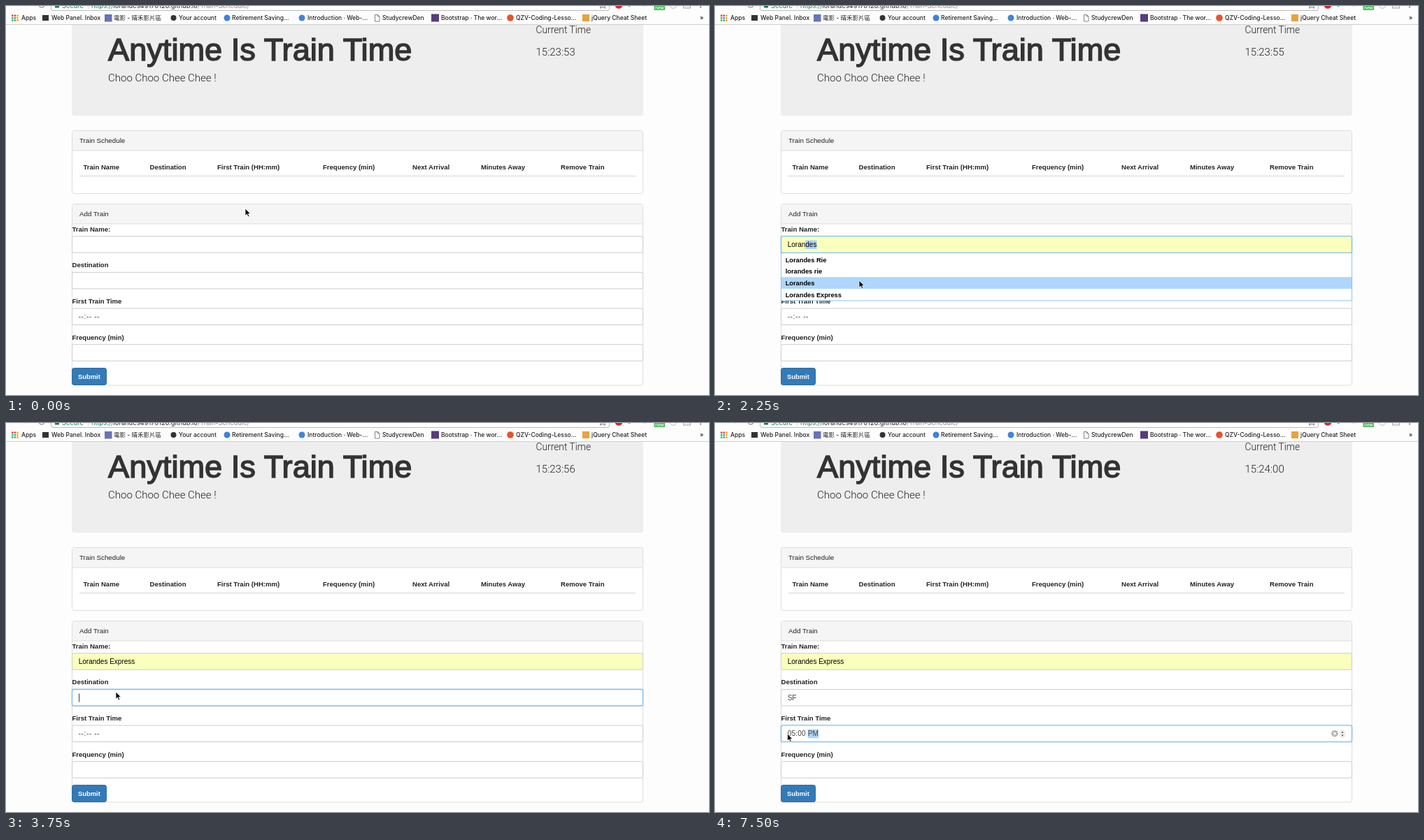
Animation, 1005 px wide and 557 px high, one loop 8000 ms. Source, as an HTML page:

```html
<!DOCTYPE html>
<html lang="en">
<head>
<meta charset="utf-8">
<title>Anytime Is Train Time</title>
<style>
  html, body { margin: 0; width: 100%; height: 100%; overflow: hidden; background: #fdfdfd; }
  svg { display: block; width: 100%; height: 100%; }
  text { white-space: pre; font: 10px "Liberation Sans", Arial, sans-serif; fill: #222; }
  .bar { font: 500 8.5px Inter, "Noto Sans CJK TC", "Noto Sans CJK SC", "Noto Sans CJK", sans-serif; }
  .url { font: 9.3px Inter, sans-serif; }
  .title { font-size: 45.2px; fill: #333; stroke: #333; stroke-width: 1.5px; }
  .light { font: 300 15px Roboto, "Liberation Sans", sans-serif; }
  .label { font-weight: bold; font-size: 9.56px; }
  .head { font-size: 9.75px; }
  .row { font-weight: bold; font-size: 9.25px; fill: #000; }
  .value { fill: #444; }
  .filled .value { fill: #000; }
  .box { fill: #fff; stroke: #ccc; }
  .filled .box { fill: #faffbd; }
  .glow { fill: none; stroke: #66afe9; stroke-opacity: .14; stroke-width: 3.5; visibility: hidden; }
  .focused .box { stroke: #75b6eb; stroke-width: 1.1; }
  .focused .glow { visibility: visible; }
</style>
</head>
<body>
<svg id="stage" viewBox="0 0 1005 557" preserveAspectRatio="none"></svg>
<script>
const byId = id => document.getElementById(id);
const stage = byId('stage');

const text = (x, y, content, cls = '', extra = '') =>
  `<text x="${x}" y="${y}" class="${cls}" ${extra}>${content}</text>`;
const rect = (x, y, w, h, fill, extra = '') =>
  `<rect x="${x}" y="${y}" width="${w}" height="${h}" fill="${fill}" ${extra}/>`;
const dot = (x, y, r, fill, extra = '') =>
  `<circle cx="${x}" cy="${y}" r="${r}" fill="${fill}" ${extra}/>`;
const path = (d, extra) => `<path d="${d}" ${extra}/>`;

function toolbar() {
  const bookmarks = [
    [22, 'Apps'], [65, 'Web Panel. Inbox'], [154, '電影 - 晴禾影片區'], [247, 'Your account'],
    [323, 'Retirement Saving...'], [431, 'Introduction · Web-...'], [538, 'StudycrewDen'],
    [622, 'Bootstrap · The wor...'], [729, 'QZV-Coding-Lesso...'], [837, 'jQuery Cheat Sheet'], [992, '»']
  ];
  const appColors = ['#e8453c', '#e8453c', '#f5a623', '#3cba54', '#4885ed', '#f5a623', '#3cba54', '#3cba54', '#f5a623'];
  const apps = appColors.map((c, i) => rect(8 + i % 3 * 3.6, 12.5 + Math.floor(i / 3) * 3.4, 2.5, 2.5, c)).join('');
  const url = '<tspan fill="#0b8043">https://</tspan>lorandes49170126.github.io<tspan fill="#888">/Train-Schedule/</tspan>';
  return rect(0, 0, 1005, 26.5, '#fdfdfd') +
    rect(0, 26, 1005, 1, '#cfcfcf') +
    rect(64.5, -14, 798, 20.5, '#fff', 'stroke="#bbb" rx="2.5"') +
    rect(70, -3, 6, 5.5, '#0b8043') +
    text(80, 2.5, '<tspan fill="#0b8043">Secure</tspan>', 'url') +
    rect(117, 0, .8, 4, '#ccc') +
    text(122, 2.5, url, 'url') +
    dot(51, -1.8, 4, 'none', 'stroke="#777"') +
    path('M24 -3l4 4M31 -3l-3 4', 'stroke="#ddd" fill="none"') +
    path('M849.5 3.2l1-5h5l1 5-3.5-2z', 'fill="none" stroke="#777"') +
    dot(876, -1.5, 5.3, '#d8262c') +
    path('M889 0h4l-2 1.5z', 'fill="#52b788"') +
    dot(913, -3, 4, '#ddd') +
    rect(926.5, -4, 15.5, 10, '#3fb950', 'rx="1"') +
    text(928, 4.6, 'new', 'bar', 'style="fill:#fff;font-size:6.5px"') +
    dot(954, -1.5, 4.8, 'none', 'stroke="#bbb"') +
    rect(968.5, -4, 10, 7, '#eee', 'stroke="#aaa"') +
    dot(993, 1.5, 1, '#666') +
    apps +
    rect(52, 13, 9, 8, '#333') +
    rect(141, 12, 10.5, 10.5, '#6674b8') +
    dot(239.5, 17, 4, '#333') +
    dot(316, 17, 4.5, '#3b82e0') +
    dot(423, 17, 4.5, '#3f86d8') +
    path('M527.5 12.5h4l2.5 2.5v7h-6.5zM531.5 12.5v2.5h2.5', 'fill="#fff" stroke="#777" stroke-width=".9"') +
    rect(608, 11.5, 11, 11, '#563d7c') +
    dot(721, 17, 4.8, '#e8532b') +
    rect(824, 12, 10, 10, '#e8a33d') +
    bookmarks.map(([x, s]) => text(x, 20.3, s, 'bar')).join('');
}

function panel(y, height, title) {
  return rect(94.5, y + .5, 816, height, '#fff', 'stroke="#ddd" rx="3"') +
    path(`M95 ${y + 29}v-25.5q0-2.5 2.5-2.5h810q2.5 0 2.5 2.5v25.5z`, 'fill="#f5f5f5"') +
    rect(95, y + 28.5, 815, 1, '#ddd') +
    text(105, y + 18, title, 'head');
}

function field(id, y, label) {
  const frame = `x="94.5" y="${y}" width="816" height="23.5" rx="2.5"`;
  return text(94.5, y - 7, label, 'label') +
    `<g id="${id}"><rect class="glow" ${frame}/><rect class="box" ${frame}/>` +
    rect(0, y + 5.7, 0, 12.6, '#add3f9', 'class="mark"') +
    text(103.7, y + 15.3, '', 'value') +
    rect(0, y + 6, .9, 12, '#222', 'class="caret"') + '</g>';
}

const columns = [[110.5, 'Train Name'], [205.5, 'Destination'], [302, 'First Train (HH:mm)'], [453, 'Frequency (min)'],
  [581, 'Next Arrival'], [679, 'Minutes Away'], [793, 'Remove Train']];

stage.innerHTML =
  rect(0, 0, 1005, 557, '#fdfdfd') +
  rect(94, 10, 817, 147, '#eee', 'rx="4"') +
  text(146, 78, 'Anytime Is Train Time', 'title') +
  text(146, 108, 'Choo Choo Chee Chee !', 'light') +
  text(757.5, 39, 'Current Time', 'light', 'style="font-size:13.8px"') +
  text(757.5, 70.5, '', 'light', 'id="clock"') +
  toolbar() +
  panel(178, 90, 'Train Schedule') +
  columns.map(([x, s]) => text(x, 234, s, 'label')).join('') +
  rect(105, 242.8, 795, 1.4, '#ddd') +
  panel(283, 259.5, 'Add Train') +
  field('name', 329.7, 'Train Name:') +
  field('dest', 381.4, 'Destination') +
  field('time', 433, 'First Train Time') +
  field('freq', 484.7, 'Frequency (min)') +
  '<g id="spinner">' + rect(893.5, 439.5, 7, 11, '#f1f1f1', 'rx="3.5" stroke="#ddd" stroke-width=".6"') +
  path('M895.3 443.8l1.7-2.3 1.7 2.3zM895.3 446.4l1.7 2.3 1.7-2.3z', 'fill="#555"') + '</g>' +
  '<g id="clear">' + dot(886, 444.7, 4.8, '#b5b5b5') +
  path('M884.2 442.9l3.6 3.6M887.8 442.9l-3.6 3.6', 'stroke="#fff" stroke-width="1.1"') + '</g>' +
  rect(94.5, 518.5, 49, 24, '#337ab7', 'stroke="#2e6da4" rx="2.8"') +
  text(103, 534, 'Submit', 'label', 'style="fill:#fff;font-size:9.4px"') +
  '<g id="menu"></g>' +
  '<g id="pointer">' +
  path('M0 0V10.2L2.4 8 4.1 11.8 5.8 11 4.2 7.4H7.4Z', 'fill="#000" stroke="#fff" stroke-width=".8"') + '</g>';

const suggestions = ['Lorandes Rie', 'lorandes rie', 'Lorandes', 'Lorandes Express', 'LOFA', 'LOFA Codeclub HW'];

// Each entry changes part of the state from its time on; values are [plain, selected, rest].
const changes = [
  [0, { name: [''], dest: [''], time: ['--:-- --'], freq: [''], focus: '', caret: false, rows: 0, hover: -1, filled: false, clear: false }],
  [1000, { focus: 'name', caret: true }],
  [1500, { name: ['L'], rows: 6 }],
  [1750, { name: ['Lo'], rows: 4 }],
  [2000, { name: ['Loran'] }],
  [2250, { name: ['Loran', 'des'], hover: 2, filled: true, caret: false }],
  [2500, { name: ['Loran', 'des Express'], hover: 3 }],
  [2750, { name: ['Lorandes Express'], rows: 0, caret: true }],
  [3500, { focus: 'dest' }],
  [4000, { dest: ['S'] }],
  [4250, { dest: ['SF'] }],
  [4500, { caret: false }],
  [5750, { focus: 'time', time: ['', '--', ':-- --'] }],
  [6500, { time: ['05:', '--', ' --'], clear: true }],
  [7000, { time: ['05:00 ', '--'] }],
  [7500, { time: ['05:00 ', 'PM'] }]
];

const pointerPath = [[0, 342, 290], [1000, 263, 354], [1250, 263, 343], [1500, 263, 343], [2250, 206, 393],
  [2500, 203, 407], [2750, 202, 408], [3000, 202, 408], [3750, 157, 385], [5000, 157, 385], [6000, 103.5, 445], [8000, 103.5, 445]];

function pointerAt(t) {
  const i = pointerPath.findIndex(p => p[0] > t);
  const [t0, x0, y0] = pointerPath[i - 1], [t1, x1, y1] = pointerPath[i];
  const u = (t - t0) / (t1 - t0), k = u * u * (3 - 2 * u);
  return [x0 + (x1 - x0) * k, y0 + (y1 - y0) * k];
}

const show = (el, on) => el.setAttribute('visibility', on ? 'visible' : 'hidden');

function drawField(id, state) {
  const group = byId(id);
  const value = group.querySelector('.value');
  const mark = group.querySelector('.mark'), caret = group.querySelector('.caret');
  const [plain, selected = '', rest = ''] = state[id];
  const focused = state.focus === id;
  group.classList.toggle('focused', focused);
  group.classList.toggle('filled', id === 'name' && state.filled);
  value.textContent = plain + selected + rest;
  if (id === 'time') value.style.letterSpacing = value.textContent.includes('-') ? '.6px' : '.2px';
  const widthOf = n => n ? value.getSubStringLength(0, n) : 0;
  const start = widthOf(plain.length), end = widthOf((plain + selected).length);
  mark.setAttribute('x', 103.7 + start);
  mark.setAttribute('width', end - start);
  caret.setAttribute('x', 104 + end);
  show(caret, focused && state.caret);
}

function menu({ rows, hover }) {
  if (!rows) return '';
  const rowHeight = 16.7, top = 354.8;
  const items = suggestions.slice(0, rows).map((s, i) =>
    (i === hover ? rect(95, top + i * rowHeight, 815, rowHeight, '#aed6fe') : '') +
    text(100.7, top + 11.8 + i * rowHeight, s, 'row'));
  return rect(94.5, 353.5, 816, rows * rowHeight + 1.6, '#fff', 'stroke="#8cc1f0"') + items.join('');
}

function draw(t) {
  const state = Object.assign({}, ...changes.filter(c => c[0] <= t).map(c => c[1]));
  const second = 53 + Math.floor(t / 1000);
  byId('clock').textContent = `15:${23 + Math.floor(second / 60)}:${String(second % 60).padStart(2, '0')}`;
  for (const id of ['name', 'dest', 'time', 'freq']) drawField(id, state);
  show(byId('spinner'), state.focus === 'time');
  show(byId('clear'), state.clear);
  byId('menu').innerHTML = menu(state);
  byId('pointer').setAttribute('transform', `translate(${pointerAt(t)})`);
}

const begin = performance.now();
let shown = -1;
function tick() {
  const t = Math.floor((performance.now() - begin) % 8000 / 250) * 250;
  if (t !== shown) draw(shown = t);
  requestAnimationFrame(tick);
}
tick();
</script>
</body>
</html>
```
